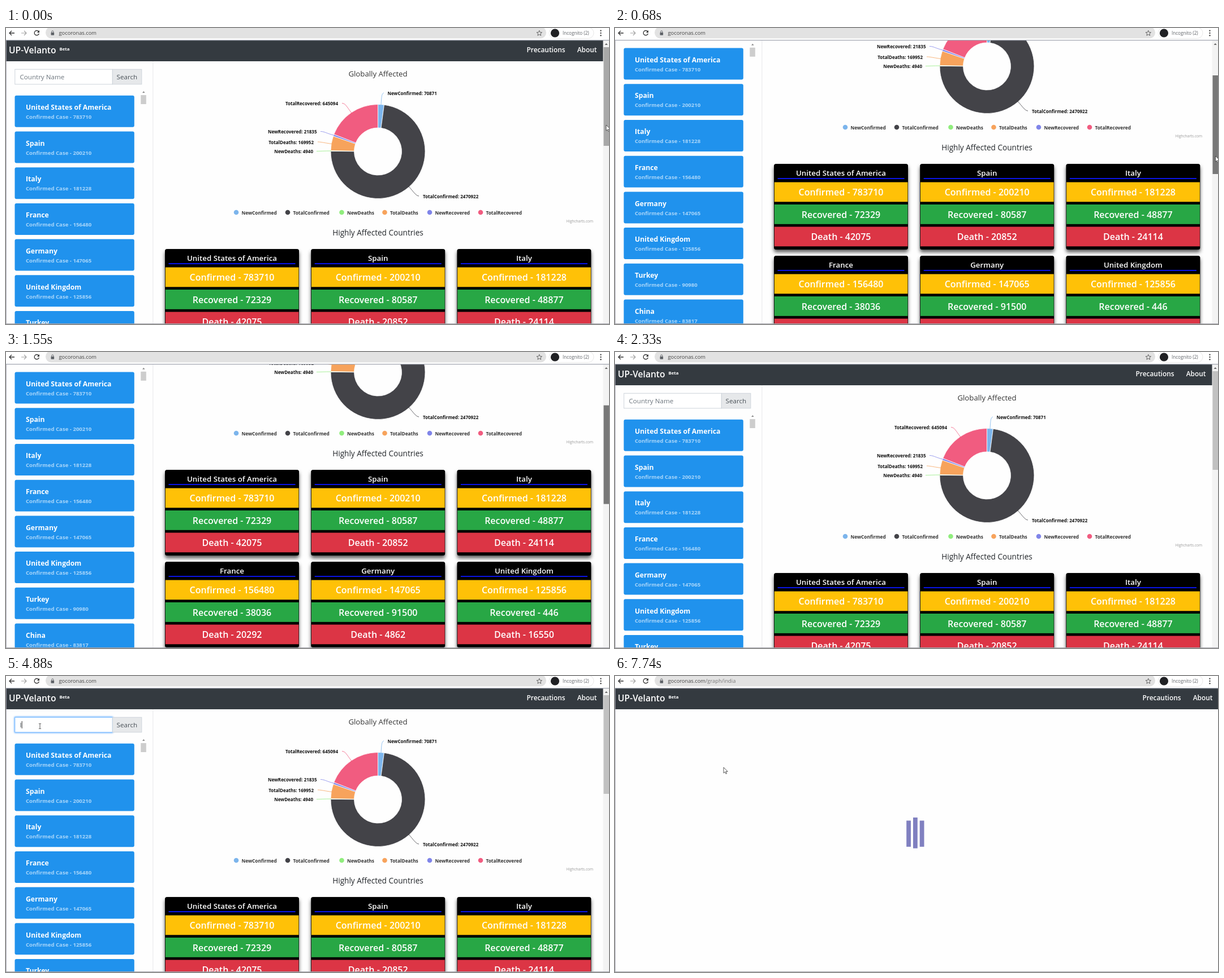
Recreate the animation shown at these times as an HTML page. Size 1066 by 525 pixels, loop 8 s.

```html
<!DOCTYPE html>
<html lang="en">
<head>
<meta charset="utf-8">
<title>Case tracker</title>
<style>
html, body { margin: 0; width: 100%; height: 100%; overflow: hidden; background: #fefefe; }
svg { display: block; width: 1066px; height: 525px; }
text { font-family: "Open Sans", "Noto Sans", sans-serif; white-space: pre; }
</style>
</head>
<body>
<svg id="stage" viewBox="0 0 1066 525"></svg>
<script>
const LOOP = 8000;
const countries = [
  ["United States of America", 783710, 72329, 42075],
  ["Spain", 200210, 80587, 20852],
  ["Italy", 181228, 48877, 24114],
  ["France", 156480, 38036, 20292],
  ["Germany", 147065, 91500, 4862],
  ["United Kingdom", 125856, 446, 16550],
  ["Turkey", 90980, 13430, 2140],
  ["China", 83817, 77062, 4636],
  ["Iran, Islamic Republic of", 83505, 59273, 5209]
];
// name, value, colour, label x, label y, label anchor, connector, legend x
const slices = [
  ["NewConfirmed", 70871, "#7cb5ec", 674.5, 119, "start", "M668 115C664 116 664 122 663 136", 407],
  ["TotalConfirmed", 2470922, "#434348", 737, 301.5, "start", "M730 298C725 298 720 290 712 281", 498],
  ["NewDeaths", 4940, "#90ed7d", 543, 222, "end", "M549 218.5C556 218.5 562 218 575 218", 593.5],
  ["TotalDeaths", 169952, "#f7a35c", 544, 205.5, "end", "M551 202C557 202 564 204 576 205.5", 669.5],
  ["NewRecovered", 21835, "#8085e9", 549.5, 187, "end", "M556 183.5C563 183.5 567 187 579 190", 749],
  ["TotalRecovered", 645094, "#f15c80", 587, 137, "end", "M594 133.5C600 133.5 602 139 611 151", 839]
];
// Stepped states: [time, ...values]
const scrollSteps = [
  [0, 0], [150, 15], [330, 60], [500, 107], [680, 151], [860, 196], [990, 240], [1130, 272],
  [1270, 262], [1410, 230], [1550, 183], [1700, 85], [1860, 0]
];
const cursorSteps = [
  [0, "arrow", 1061, 172], [150, "arrow", 1061, 177], [330, "arrow", 1061, 193], [500, "arrow", 1061, 210],
  [680, "arrow", 1061.5, 227], [860, "arrow", 1062, 242], [990, "arrow", 1063, 257], [1130, "arrow", 1064.5, 268],
  [1270, "", 0, 0], [2790, "arrow", 1020, 196], [2930, "arrow", 900, 188], [3080, "arrow", 760, 172],
  [3220, "arrow", 618, 156], [3360, "beam", 59, 91], [3500, "beam", 60, 89], [5830, "beam", 110, 89],
  [5970, "arrow", 205, 86], [6250, "arrow", 210, 96], [6380, "arrow", 205, 122], [6520, "arrow", 199, 144],
  [6650, "arrow", 194, 158], [6790, "arrow", 192, 162]
];
const thumbSteps = [[0, "#a8a8a8"], [150, "#787878"], [2330, "#c1c1c1"]];
const typedSteps = [[0, ""], [4880, "I"], [5020, "In"], [5160, "Indi"], [5300, "India"]];
const caretSteps = [[0, 0], [3930, 1], [4330, 0], [4880, 1], [5830, 0]];
const tipSteps = [[0, 0], [3220, 1], [3640, 0.5], [3770, 0]];
const FOCUS = 3930, FILTER = 6110, LOAD = 6920, FRAME = 820 / 6;

const text = (x, y, size, weight, fill, str, anchor = "start", extra = "") =>
  `<text x="${x}" y="${y}" font-size="${size}" font-weight="${weight}" fill="${fill}" text-anchor="${anchor}" ${extra}>${str}</text>`;
const rect = (x, y, w, h, fill, extra = "") =>
  `<rect x="${x}" y="${y}" width="${w}" height="${h}" fill="${fill}" ${extra}/>`;
const circle = (x, y, r, fill) => `<circle cx="${x}" cy="${y}" r="${r}" fill="${fill}"/>`;
const path = (d, stroke, width = 1, fill = "none", extra = "") =>
  `<path d="${d}" stroke="${stroke}" stroke-width="${width}" fill="${fill}" ${extra}/>`;
const group = (id, body) => `<g id="${id}">${body}</g>`;

function donut() {
  const cx = 657.5, cy = 219, R = 83.5, r = 42;
  const total = slices.reduce((sum, s) => sum + s[1], 0);
  const point = (a, rad) => `${cx + rad * Math.sin(a)} ${cy - rad * Math.cos(a)}`;
  let a = 0;
  return slices.map(([, value, color]) => {
    const b = a + value / total * 2 * Math.PI, big = b - a > Math.PI ? 1 : 0;
    const d = `M${point(a, R)}A${R} ${R} 0 ${big} 1 ${point(b, R)}L${point(b, r)}A${r} ${r} 0 ${big} 0 ${point(a, r)}Z`;
    a = b;
    return path(d, "#fff", 0.8, color);
  }).join("");
}

function chart() {
  const labels = slices.map(([name, value, color, x, y, anchor, line, lx]) =>
    path(line, color, 0.8) +
    text(x, y, 8, 700, "#111", `${name}: ${value}`, anchor) +
    circle(lx, 327, 4.3, color) +
    text(lx + 9.5, 330.5, 8.3, 700, "#333", name)).join("");
  return text(657.5, 86, 13.2, 400, "#333", "Globally Affected", "middle") + donut() + labels +
    text(1038, 345, 6.5, 400, "#999", "Highcharts.com", "end") +
    text(657.5, 368, 13.6, 500, "#212529", "Highly Affected Countries", "middle");
}

function bigCard([name, ...counts], i) {
  const x = 281 + i % 3 * 258.2, y = 392 + Math.floor(i / 3) * 163, mid = x + 118.5;
  const rows = [["Confirmed", "#ffc107"], ["Recovered", "#28a745"], ["Death", "#dc3545"]];
  return rect(x, y, 237, 152, "#000", 'rx="3.5" filter="url(#shade)"') +
    text(mid, y + 21, 13.3, 600, "#fff", name, "middle") +
    rect(x + 6.5, y + 25, 224, 2, "#0a14e6") +
    rows.map(([label, color], k) => {
      const top = y + 32.5 + k * 39.5;
      return rect(x + 0.8, top, 235.6, 34.8, color) +
        text(mid, top + 23.5, 16, 600, "#fff", `${label} - ${counts[k]}`, "middle");
    }).join("");
}

const sideCard = ([name, count], i) => {
  const y = 119.8 + i * 63.7;
  return rect(15.5, y, 211.3, 56, "#2092ed", 'rx="3"') +
    text(35, y + 25.2, 12.2, 700, "#fff", name) +
    text(35, y + 41.2, 9.6, 700, "#a9d6fa", `Confirmed Case - ${count}`);
};

const header = (id, right) => group(id,
  rect(0, 22, 1066, 37, "#343a40") +
  text(5, 44.5, 15.6, 600, "#fff", "UP-Velanto") +
  text(94.5, 40, 7.8, 700, "#fff", "Beta") +
  text(right - 56, 43, 11.9, 600, "#fff", "Precautions", "end") +
  text(right, 43, 11.9, 600, "#fff", "About", "end"));

const sidebar = () => group("side",
  rect(15.8, 73.3, 172.5, 26.5, "#fff", 'id="field" stroke="#ced4da"') +
  rect(188.3, 73.3, 51.5, 26.5, "#e6e8ea", 'id="button" stroke="#ced4da"') +
  text(213.8, 91, 11.6, 400, "#495057", "Search", "middle") +
  text(24.5, 91, 11.6, 400, "#6c757d", "Country Name", "start", 'id="hint"') +
  text(24.5, 91, 11.6, 400, "#495057", "", "start", 'id="typed"') +
  rect(24.5, 80, 0.9, 13, "#222", 'id="caret"') +
  group("all", countries.slice(0, 8).map(sideCard).join("") +
    path("M241 115L243.3 112L245.6 115Z", "none", 0, "#8a8a8a") + rect(238.3, 119, 9.5, 16, "#cdcdcd")) +
  group("found", sideCard(["India", 18601], 0)));

const tooltip = () => group("tip",
  rect(568.5, 100.3, 135, 33.5, "#f7f7f7", 'rx="2" fill-opacity=".87" stroke="#f15c80" filter="url(#soft)"') +
  text(574, 114, 7.2, 400, "#333", "TotalRecovered") + circle(577, 122, 2.6, "#f15c80") +
  text(583, 125, 8.5, 400, "#333", "Number of People:") + text(661, 125, 9, 700, "#333", "645 094"));

const toolbar = () =>
  rect(0, 0, 1066, 21, "#fff") + rect(70, -2, 885, 20.5, "#e2e2e2", 'rx="10"') +
  rect(0, 21, 1066, 1.3, "#a5a9b4") +
  path("M15 9H6M10 5L6 9L10 13", "#333", 1.3) + path("M27 9H36M32 5L36 9L32 13", "#a2a2a2", 1.2) +
  path("M57.6 6A4.2 4.2 0 1 0 58.4 10", "#333", 1.3) + path("M59 4V8.2H54.8Z", "none", 0, "#333") +
  rect(79.5, 8, 5.6, 4.7, "#5f6368", 'rx=".7"') + path("M80.7 8V6.6A1.6 1.6 0 0 1 83.9 6.6V8", "#5f6368") +
  text(93.5, 12.3, 9.3, 400, "#444", 'gocoronas.com<tspan id="route" fill="#777">/graph/india</tspan>') +
  path("M942.8 4.4L944.1 7.6L947.5 7.8L944.9 10L945.7 13.3L942.8 11.5L939.9 13.3L940.7 10L938.1 7.8L941.5 7.6Z", "#555", 0.9) +
  rect(960.5, -1, 78.5, 19.5, "#fff", 'rx="9.7" stroke="#e8e8e8"') + circle(970.5, 9, 7.6, "#202124") +
  text(984, 12, 8.1, 400, "#5f6368", "Incognito (2)") +
  [4.7, 9, 13.3].map(y => circle(1051.5, y, 1.2, "#444")).join("");

const stage = document.getElementById("stage");
stage.innerHTML = `<defs>
  <filter id="shade" x="-10%" y="-10%" width="120%" height="125%"><feDropShadow dx="0" dy="4.5" stdDeviation="3" flood-opacity=".65"/></filter>
  <filter id="soft" x="-10%" y="-20%" width="120%" height="150%"><feDropShadow dx="1" dy="1" stdDeviation="1" flood-opacity=".25"/></filter>
  </defs>` + rect(0, 0, 1066, 525, "#fefefe") +
  group("home",
    rect(259.3, 22, 1, 503, "#e9e9ec") + sidebar() +
    group("page", chart() + countries.map(bigCard).join("") + tooltip() + header("nav", 1044.5)) +
    rect(1055.5, 22, 11, 503, "#f3f3f3") + path("M1058.6 30L1061.2 27L1063.8 30Z", "none", 0, "#666") +
    rect(1056.5, 34, 9.5, 175, "#a8a8a8", 'id="thumb"')) +
  group("loading", header("wideNav", 1056.5) +
    [515.2, 527, 538.7].map(x => rect(x, 266.6, 7.8, 31, "#8080c0", 'class="bar"')).join("")) +
  rect(0, 22, 0.8, 503, "#a2a2b0") + rect(0, 524, 1066, 1, "#a5a5ad") + toolbar() +
  group("arrow", path("M0 0V10.2L2.4 8L4 11.6L5.6 10.9L4 7.4H7.2Z", "#333", 0.8, "#fff")) +
  group("beam", path("M-2 -4.5H-.6L0 -4L.6 -4.5H2M0 -4V4M-2 4.5H-.6L0 4L.6 4.5H2", "#444", 0.9));

const ui = {};
stage.querySelectorAll("[id]").forEach(node => ui[node.id] = node);
const bars = stage.querySelectorAll(".bar");
const at = (steps, t) => steps.filter(s => s[0] <= t).pop().slice(1);
const show = (node, on) => node.setAttribute("display", on ? "inline" : "none");
const set = (node, attrs) => Object.entries(attrs).forEach(([k, v]) => node.setAttribute(k, v));
const ring = (node, on, color, glow) => {
  node.setAttribute("stroke", on ? color : "#ced4da");
  node.style.filter = on ? `drop-shadow(0 0 1.5px ${glow}) drop-shadow(0 0 1px ${glow})` : "none";
};

// 0 at rest, 1 at the peak (40% of a one second cycle), rest from 80%
function pulse(phase) {
  const p = (phase % 1 + 1) % 1;
  const k = Math.max(0, 1 - Math.abs(p - 0.4) / 0.4);
  return k * k * (3 - 2 * k);
}

function render(t) {
  const loading = t >= LOAD, filtered = t >= FILTER;
  show(ui.home, !loading);
  show(ui.loading, loading);
  show(ui.route, loading);

  const [scroll] = at(scrollSteps, t);
  set(ui.page, { transform: `translate(0 ${-scroll})` });
  set(ui.side, { transform: `translate(0 ${-Math.min(scroll, 84.2)})` });
  set(ui.thumb, { y: 34 + scroll / 3.02, fill: at(thumbSteps, t)[0] });

  const [typed] = at(typedSteps, t);
  ui.typed.textContent = typed;
  show(ui.hint, !typed);
  show(ui.caret, at(caretSteps, t)[0]);
  set(ui.caret, { x: 24.5 + (typed ? ui.typed.getComputedTextLength() : 0) });
  ring(ui.field, t >= FOCUS && !filtered, "#80bdff", "#80bdff");
  ring(ui.button, filtered, "#ced4da", "#d0d3d6");
  show(ui.all, !filtered);
  show(ui.found, filtered);
  set(ui.tip, { opacity: at(tipSteps, t)[0] });

  const [shape, x, y] = at(cursorSteps, t);
  for (const name of ["arrow", "beam"]) {
    show(ui[name], shape === name);
    set(ui[name], { transform: `translate(${x} ${y})` });
  }

  const held = Math.floor((t - LOAD) / FRAME + 0.001) * FRAME - 820;
  bars.forEach((bar, i) => {
    const k = pulse(held / 1000 + 0.4 + (1 - i) * 0.16);
    set(bar, { y: 266.6 - 15.6 * k, height: 31.2 + 23.4 * k });
  });
}

const start = performance.now();
function tick() {
  render((performance.now() - start) % LOOP);
  requestAnimationFrame(tick);
}
tick();
</script>
</body>
</html>
```
